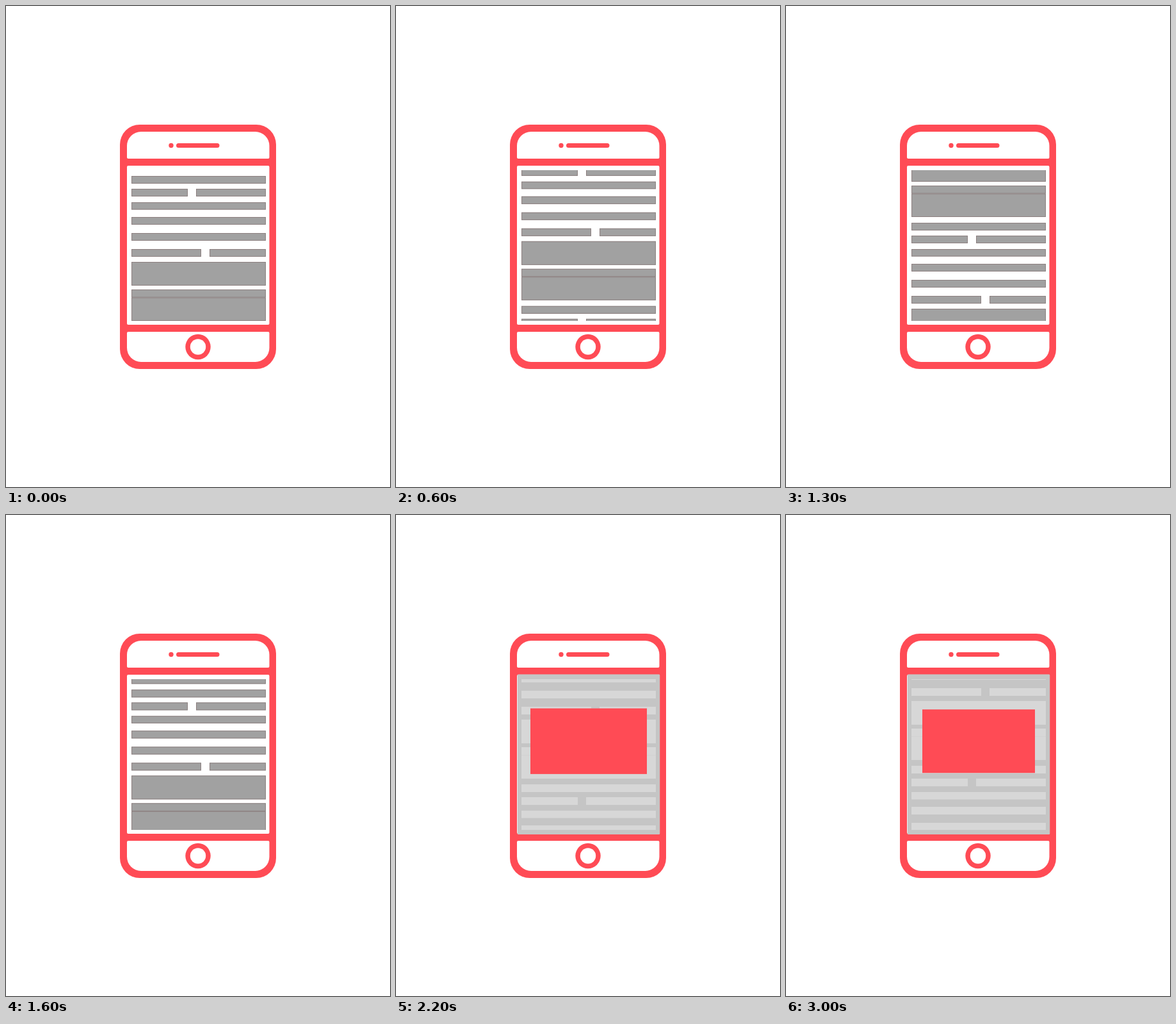
These frames come from a looping animation (600x750 px, 5000 ms). An HTML page with a canvas:

```html
<!DOCTYPE html>
<html lang="en">
<head>
<meta charset="utf-8">
<title>Phone scroll</title>
<style>
  html, body { margin: 0; width: 100%; height: 100%; overflow: hidden; background: #fff; }
  canvas { display: block; width: 600px; height: 750px; }
</style>
</head>
<body>
<canvas id="stage" width="600" height="750"></canvas>
<script>
const ctx = document.getElementById('stage').getContext('2d');
const LOOP = 5000, STEP = 100;
const RED = '#ff4b55', GREY = '#a1a1a1', EDGE = '#8d8080';
const DIM = '#c5c5c5', DIM_BAR = '#d7d7d7';

// One page of content: y, height, optional gap [left, right]
const ROWS = [
  [265, 12], [285, 12, [284, 297]], [306, 11.5], [329, 12], [354, 12],
  [379, 12, [305, 318]], [399, 37], [442, 12.5], [454.5, 36.5]
];
const PAGE = 235, LEFT = 196, RIGHT = 406, TOP = 256, BOTTOM = 491;

// Motion keys: [ms, value]
const SCROLL = [[0, 0], [400, 14], [900, 76], [1300, 162], [1800, 265],
  [2200, 315], [2500, 335], [2800, 343], [3000, 344]];
const SHADE = [[1600, 0], [1800, 0.484], [2000, 1]];
const CARD = [[1800, 0], [2100, 1.055], [2200, 1.034], [2400, 1]];

// Smooth curve through the keys, flat at both ends
function curve(keys, t) {
  const last = keys.length - 1;
  if (t <= keys[0][0]) return keys[0][1];
  if (t >= keys[last][0]) return keys[last][1];
  const i = keys.findIndex(k => k[0] > t) - 1;
  const slope = n => {
    if (n === 0 || n === last) return 0;
    const [a, b, c] = [keys[n - 1], keys[n], keys[n + 1]];
    const d1 = (b[1] - a[1]) / (b[0] - a[0]);
    const d2 = (c[1] - b[1]) / (c[0] - b[0]);
    return d1 * d2 <= 0 ? 0 : 2 * d1 * d2 / (d1 + d2);
  };
  const [t0, v0] = keys[i], [t1, v1] = keys[i + 1];
  const w = t1 - t0, u = (t - t0) / w, r = 1 - u;
  return v0 * (1 + 2 * u) * r * r + slope(i) * w * u * r * r
    + v1 * u * u * (3 - 2 * u) - slope(i + 1) * w * u * u * r;
}

function clipped(x, y, w, h, draw) {
  ctx.save();
  ctx.beginPath();
  ctx.rect(x, y, w, h);
  ctx.clip();
  draw();
  ctx.restore();
}

function bar(x0, x1, y, h, fill, edge) {
  ctx.fillStyle = fill;
  ctx.fillRect(x0, y, x1 - x0, h);
  if (!edge) return;
  ctx.strokeStyle = edge;
  ctx.lineWidth = 1;
  ctx.strokeRect(x0 + 0.5, y + 0.5, x1 - x0 - 1, h - 1);
}

function content(scroll, fill, edge) {
  clipped(LEFT, TOP, RIGHT - LEFT, BOTTOM - TOP, () => {
    for (let page = 0; page < 3; page++) {
      for (const [y0, h, gap] of ROWS) {
        const y = y0 + page * PAGE - scroll;
        if (y > BOTTOM || y + h < TOP) continue;
        if (gap) {
          bar(LEFT, gap[0], y, h, fill, edge);
          bar(gap[1], RIGHT, y, h, fill, edge);
        } else {
          bar(LEFT, RIGHT, y, h, fill, edge);
        }
      }
    }
  });
}

function roundBox(x, y, w, h, r) {
  ctx.beginPath();
  ctx.roundRect(x, y, w, h, r);
  ctx.fill();
}

function disc(x, y, r) {
  ctx.beginPath();
  ctx.arc(x, y, r, 0, 7);
  ctx.fill();
}

function phone() {
  ctx.fillStyle = RED;
  roundBox(178, 185, 244, 381, 31);
  ctx.fillStyle = '#fff';
  roundBox(189, 196, 222.5, 42, [22, 22, 2, 2]);
  roundBox(189, 249, 222.5, 248, 2);
  roundBox(189, 508, 222.5, 47, [2, 2, 22, 22]);
  ctx.fillStyle = RED;
  disc(258, 217.5, 3.7);
  roundBox(266, 214, 67.5, 7, 3.5);
  disc(300, 531.5, 19.7);
  ctx.fillStyle = '#fff';
  disc(300, 531.5, 12.2);
}

function shade(scale, scroll) {
  const w = 223 * scale, h = 250 * scale;
  const x = 301 - w / 2, y = 373.2 - h / 2;
  clipped(x, y, w, h, () => {
    ctx.fillStyle = DIM;
    roundBox(189.5, 248.2, 223, 250, 2);
    content(scroll, DIM_BAR);
  });
}

function card(scale) {
  const w = 176 * scale, h = 99 * scale;
  ctx.fillStyle = RED;
  ctx.fillRect(301 - w / 2, 352.7 - h / 2, w, h);
}

function draw(t) {
  const scroll = curve(SCROLL, t);
  const dim = curve(SHADE, t), pop = curve(CARD, t);
  ctx.fillStyle = '#fff';
  ctx.fillRect(0, 0, 600, 750);
  phone();
  content(scroll, GREY, EDGE);
  if (dim > 0) shade(dim, scroll);
  if (pop > 0) card(pop);
}

function tick() {
  const t = performance.now() % LOOP;
  draw(Math.floor(t / STEP) * STEP);
  requestAnimationFrame(tick);
}
tick();
</script>
</body>
</html>
```
